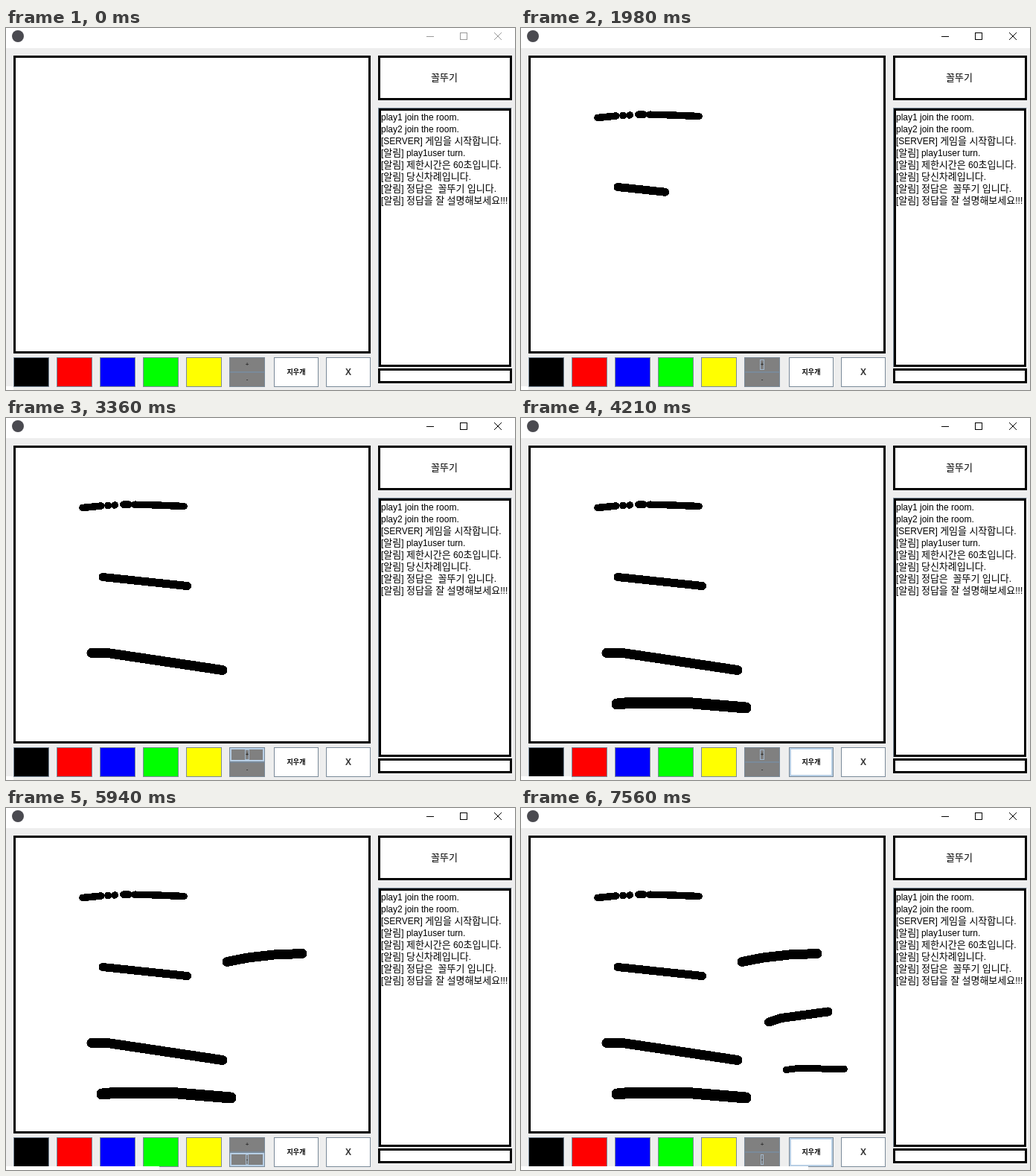
These frames come from a looping animation (684x486 px, 7.59 s). An HTML page:

```html
<!DOCTYPE html>
<html lang="ko">
<head>
<meta charset="utf-8">
<style>
  html, body { margin: 0; width: 684px; height: 486px; overflow: hidden; background: #eee; }
  body { position: relative; color: #000; font: 12px/16px "Liberation Sans", sans-serif; }
  div, svg { position: absolute; box-sizing: border-box; }
  .ko { font: 13px/0 "Noto Sans CJK KR", "Noto Sans CJK", sans-serif; }
  .title { width: 684px; height: 27px; background: #fff; }
  .icon { left: 8px; top: 3px; width: 16px; height: 16px; border-radius: 50%; background: #4a4a50; }
  .panel { background: #fff; border: 3px solid #000; }
  .frame { border: 1px solid #7a8a99; border-right-color: #fff; border-bottom-color: #fff; }
  .button { border: 1px solid #7a8a99; display: flex; align-items: center; justify-content: center;
            font-weight: bold; color: #333; }
  .small { font-size: 8px; line-height: 12px; }
  .small .ko { font-size: 9px; font-weight: bold; color: #000; }
  .button.hover { box-shadow: inset 0 0 0 2px #b8cfe5; }
  .button.pressed { background: #b8cfe5 !important; }
  .button.focus span { outline: 1px solid #a3b8cc; }
  #strip { left: 0; top: 481px; height: 5px; background: #fff; }
  #ink { fill: none; stroke: #000; stroke-linecap: round; stroke-linejoin: round; shape-rendering: crispEdges; }
</style>
</head>
<body>
<div class="title"></div>
<div class="icon"></div>
<svg id="controls" width="684" height="27" fill="none" shape-rendering="crispEdges">
  <path d="M565 11.5h10M610.5 6.5h9v9h-9z"/>
  <path d="M656 6l10 10M666 6l-10 10" shape-rendering="auto"/>
</svg>
<script>
const add = (cls, x, y, w, h, html = '', background = '') => {
  const el = document.createElement('div');
  el.className = cls;
  Object.assign(el.style, { left: x + 'px', top: y + 'px', width: w + 'px', height: h + 'px' });
  if (background) el.style.background = background;
  el.innerHTML = html.replace(/[가-힣]+/g, '<span class="ko">$&</span>');
  document.body.append(el);
  return el;
};

add('panel', 10, 37, 480, 400);
add('panel', 500, 37, 180, 60);
add('', 500, 59, 178, 16, '꼴뚜기').style.textAlign = 'center';
add('frame', 500, 107, 180, 349);
add('panel', 501, 108, 178, 347);
add('panel', 500, 457, 180, 20);
[
  'play1 join the room.',
  'play2 join the room.',
  '[SERVER] 게임을 시작합니다.',
  '[알림] play1user turn.',
  '[알림] 제한시간은 60초입니다.',
  '[알림] 당신차례입니다.',
  '[알림] 정답은&nbsp; 꼴뚜기 입니다.',
  '[알림] 정답을 잘 설명해보세요!!!',
].forEach((line, i) => {
  add('', 504, 112 + 16 * i, 174, 16, line).style.whiteSpace = 'nowrap';
});

['#000', '#f00', '#00f', '#0f0', '#ff0'].forEach((color, i) =>
  add('button', 10 + 58 * i, 442, 48, 40, '', color));
const buttons = {
  plus: add('button small', 300, 442, 48, 20, '<span>+</span>', '#808080'),
  minus: add('button small', 300, 462, 48, 20, '<span>-</span>', '#808080'),
  eraser: add('button small', 360, 442, 60, 40, '지우개', '#fff'),
};
add('button', 430, 442, 60, 40, 'X', '#fff');
const strip = add('', 0, 481, 10, 5);
strip.id = 'strip';

// Pen strokes: start, end, steps, pen width, points, optional dashes
const strokes = [
  [470, 670, 10, 9.5, [103, 120.5, 128, 118, 146, 117, 158, 116, 190, 116.5, 239, 118.5],
    '25 9 .5 8.5 .5 11.5 7 8 200'],
  [1900, 2120, 12, 11, [130, 213.5, 243.5, 225.5]],
  [3020, 3160, 8, 13, [115, 315.5, 140, 316, 291, 338.5]],
  [3920, 4120, 8, 15, [129, 384, 145, 382.5, 225, 382.5, 302, 389]],
  [5080, 5220, 8, 13, [297, 206.5, 325, 201, 360, 197, 398, 195.5]],
  [6150, 6270, 7, 12, [333, 287.5, 350, 282, 412.5, 273.5]],
  [7240, 7360, 7, 9, [356, 351.5, 372, 349.5, 434.5, 350.5]],
];

// White strip along the lower edge: start, end, steps, final width
const stripMoves = [
  [3920, 4210, 9, 68], [4470, 4550, 2, 77], [4760, 4890, 4, 108], [5080, 5220, 8, 170],
  [5590, 5670, 2, 190], [5870, 5980, 4, 221], [6150, 6270, 7, 272], [6480, 6640, 3, 294],
  [6860, 7000, 4, 324], [7240, 7360, 7, 360], [7560, 7560, 1, 386],
];

// Pointer: time, hovered button, pressed
const pointer = [
  [0], [940, 'plus'], [1000, 'minus'], [1210, 'plus'], [1370, 'plus', true], [1450, 'plus'], [1500],
  [2330, 'plus'], [2680, 'plus', true], [2760, 'plus'], [2810],
  [3360, 'plus'], [3630, 'plus', true], [3690, 'plus'], [3730],
  [4210, 'eraser'], [4470], [4550, 'minus'], [4760, 'minus', true], [4840, 'minus'], [4890],
  [5590, 'plus'], [5670, 'minus'], [5870, 'minus', true], [5940, 'minus'], [5980],
  [6480, 'eraser'], [6560], [6640, 'minus'], [6860, 'minus', true], [6950, 'minus'], [7000],
  [7560, 'eraser'],
];

const svgNode = (name, parent) =>
  parent.appendChild(document.createElementNS('http://www.w3.org/2000/svg', name));
const ink = svgNode('svg', document.body);
ink.id = 'ink';
ink.setAttribute('width', 684);
ink.setAttribute('height', 486);
const lines = strokes.map(([, , , width, , dash]) => {
  const line = svgNode('polyline', ink);
  line.setAttribute('stroke-width', width);
  if (dash) line.setAttribute('stroke-dasharray', dash);
  return line;
});

const stepped = (t, start, end, steps) => {
  if (t < start) return 0;
  if (t >= end) return 1;
  return (Math.floor((t - start) / (end - start) * (steps - 1) + 1e-6) + 1) / steps;
};

// The strokes run left to right, so they are cut at an x position
const cut = (pts, p) => {
  const limit = pts[0] + (pts.at(-2) - pts[0]) * p;
  const out = [pts[0], pts[1]];
  for (let i = 2; i < pts.length; i += 2) {
    const [x0, y0, x, y] = pts.slice(i - 2, i + 2);
    if (x > limit) {
      out.push(limit, y0 + (y - y0) * (limit - x0) / (x - x0));
      break;
    }
    out.push(x, y);
  }
  return out.join(' ');
};

const render = t => {
  const controls = document.getElementById('controls');
  controls.setAttribute('stroke', t < 470 ? '#999' : '#000');

  strokes.forEach(([start, end, steps, , pts], i) => {
    const p = stepped(t, start, end, steps) ** 0.66;
    lines[i].setAttribute('points', p ? cut(pts, p) : '');
  });

  let width = 10;
  for (const [start, end, steps, to] of stripMoves)
    width += (to - width) * stepped(t, start, end, steps);
  strip.style.width = Math.round(width) + 'px';

  const [, hovered, pressed] = pointer.findLast(([time]) => time <= t);
  const focused = t < 1370 ? '' : t < 4760 ? 'plus' : 'minus';
  for (const name in buttons) {
    const { classList } = buttons[name];
    classList.toggle('hover', name === hovered);
    classList.toggle('pressed', name === hovered && !!pressed);
    classList.toggle('focus', name === focused);
  }
};

const began = performance.now();
const tick = () => {
  render((performance.now() - began) % 7590);
  requestAnimationFrame(tick);
};
tick();
</script>
</body>
</html>
```
